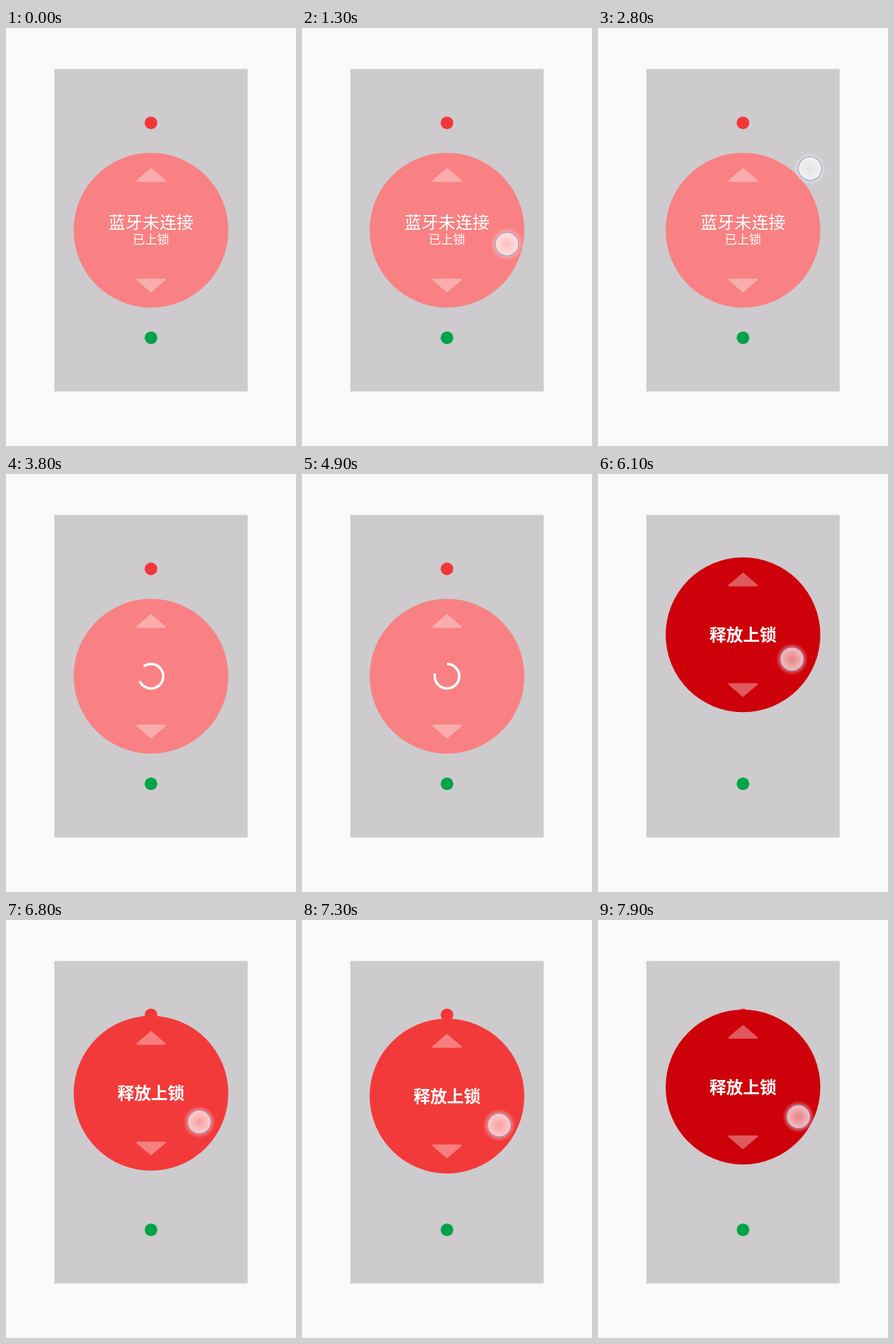
Write an HTML page with a canvas that moves like this. It is 450 by 648 pixels and loops after 8000 ms.

```html
<!DOCTYPE html>
<html lang="zh">
<head>
<meta charset="utf-8">
<style>
  html, body { margin: 0; overflow: hidden; }
  canvas { display: block; }
</style>
</head>
<body>
<canvas id="stage" width="450" height="648"></canvas>
<script>
const ctx = document.getElementById('stage').getContext('2d');
const LOOP = 8000, STEP = 100, CX = 225, REST = 313.5;

// Rows: time, finger x, finger y, disc centre y
const SWIPE = [
  [700, 305, 365], [1000, 300, 350], [1300, 318, 335],
  [1500, 388, 290], [1700, 424, 190], [1800, 427, 132]
];
const TAP = [[2800, 329, 218], [2900, 329, 218]];
const DRAG = [
  [5300, 312, 352, REST], [5500, 312, 352, REST], [6100, 301, 287, 249.3],
  [6400, 299, 275, 237.3], [6800, 300, 313, 268.6], [7000, 303, 338, 293],
  [7300, 306, 318, 273], [7600, 309, 283, 237.3], [7900, 311, 305, 259]
];

// Smooth curve through the rows that stays flat at turning points
function sample(rows, t, col) {
  const last = rows.length - 1;
  const slope = i => (rows[i + 1][col] - rows[i][col]) / (rows[i + 1][0] - rows[i][0]);
  const tangent = i => {
    if (i === 0) return slope(0);
    if (i === last) return slope(last - 1);
    const a = slope(i - 1), b = slope(i);
    return a * b <= 0 ? 0 : 2 * a * b / (a + b);
  };
  if (t <= rows[0][0]) return rows[0][col];
  if (t >= rows[last][0]) return rows[last][col];
  let i = 0;
  while (t >= rows[i + 1][0]) i++;
  const span = rows[i + 1][0] - rows[i][0], u = (t - rows[i][0]) / span;
  const ease = u * u * (3 - 2 * u);
  return rows[i][col] + (rows[i + 1][col] - rows[i][col]) * ease
    + span * u * (1 - u) * ((1 - u) * tangent(i) - u * tangent(i + 1));
}

function circle(x, y, r, fill) {
  ctx.fillStyle = fill;
  ctx.beginPath();
  ctx.arc(x, y, r, 0, Math.PI * 2);
  ctx.fill();
}

function arrow(cy, dir) {
  const base = cy + dir * 75, tip = cy + dir * 96.5;
  ctx.fillStyle = 'rgba(255,255,255,.35)';
  ctx.beginPath();
  ctx.moveTo(CX, tip);
  ctx.lineTo(CX + 23, base + dir * 2);
  ctx.lineTo(CX + 22, base);
  ctx.lineTo(CX - 22, base);
  ctx.lineTo(CX - 23, base + dir * 2);
  ctx.fill();
}

function label(text, y, size, weight) {
  ctx.font = `${weight} ${size}px "Noto Sans CJK SC", "Noto Sans CJK", sans-serif`;
  ctx.textAlign = 'center';
  ctx.textBaseline = 'middle';
  ctx.fillStyle = '#fff';
  ctx.fillText(text, CX, y);
}

function spinner(t) {
  const start = (t - 2900) / 1000 * Math.PI * 2 - Math.PI / 2;
  ctx.strokeStyle = '#fff';
  ctx.lineWidth = 4;
  ctx.beginPath();
  ctx.arc(CX, REST, 19, start, start + Math.PI * 1.57);
  ctx.stroke();
}

function radial(x, y, r0, r1, a0, a1) {
  const g = ctx.createRadialGradient(x, y, r0, x, y, r1);
  g.addColorStop(0, `rgba(255,255,255,${a0})`);
  g.addColorStop(1, `rgba(255,255,255,${a1})`);
  return g;
}

function finger(x, y) {
  ctx.beginPath();
  ctx.arc(x, y, 25, 0, Math.PI * 2);
  ctx.arc(x, y, 18, 0, Math.PI * 2, true);
  ctx.fillStyle = radial(x, y, 18, 25, 0.35, 0);
  ctx.fill();
  circle(x, y, 18, radial(x, y, 0, 18, 0.5, 0.75));
  ctx.strokeStyle = 'rgba(120,140,200,.6)';
  ctx.lineWidth = 1.5;
  ctx.beginPath();
  ctx.arc(x, y, 18.2, 0, Math.PI * 2);
  ctx.stroke();
}

function draw(t) {
  const connected = t >= 5000;
  const cy = sample(DRAG, t, 3);
  const color = !connected ? '#f98183' : cy < 264 ? '#ce0009' : '#f33a3a';

  ctx.fillStyle = '#faf9fc';
  ctx.fillRect(0, 0, 450, 648);
  ctx.fillStyle = '#cdcbcd';
  ctx.fillRect(75, 63.5, 300, 500);
  circle(CX, 147, 9.8, '#f33638');
  circle(CX, 480.3, 9.8, '#00a347');
  circle(CX, cy, 120, color);
  arrow(cy, -1);
  arrow(cy, 1);

  if (t < 2900) {
    label('蓝牙未连接', 301, 26.4, 500);
    label('已上锁', 328, 19, 500);
  } else if (!connected) {
    spinner(t);
  } else {
    label(cy > 300 ? '已上锁' : '释放上锁', cy, 26, 700);
  }

  const touch = t >= 5300 ? DRAG
    : t >= 2800 && t < 3000 ? TAP
    : t >= 700 && t < 1900 ? SWIPE : null;
  if (touch) finger(sample(touch, t, 1), sample(touch, t, 2));
}

const origin = performance.now();
function tick() {
  const t = (performance.now() - origin) % LOOP;
  draw(Math.floor(t / STEP) * STEP);
  requestAnimationFrame(tick);
}
tick();
</script>
</body>
</html>
```
